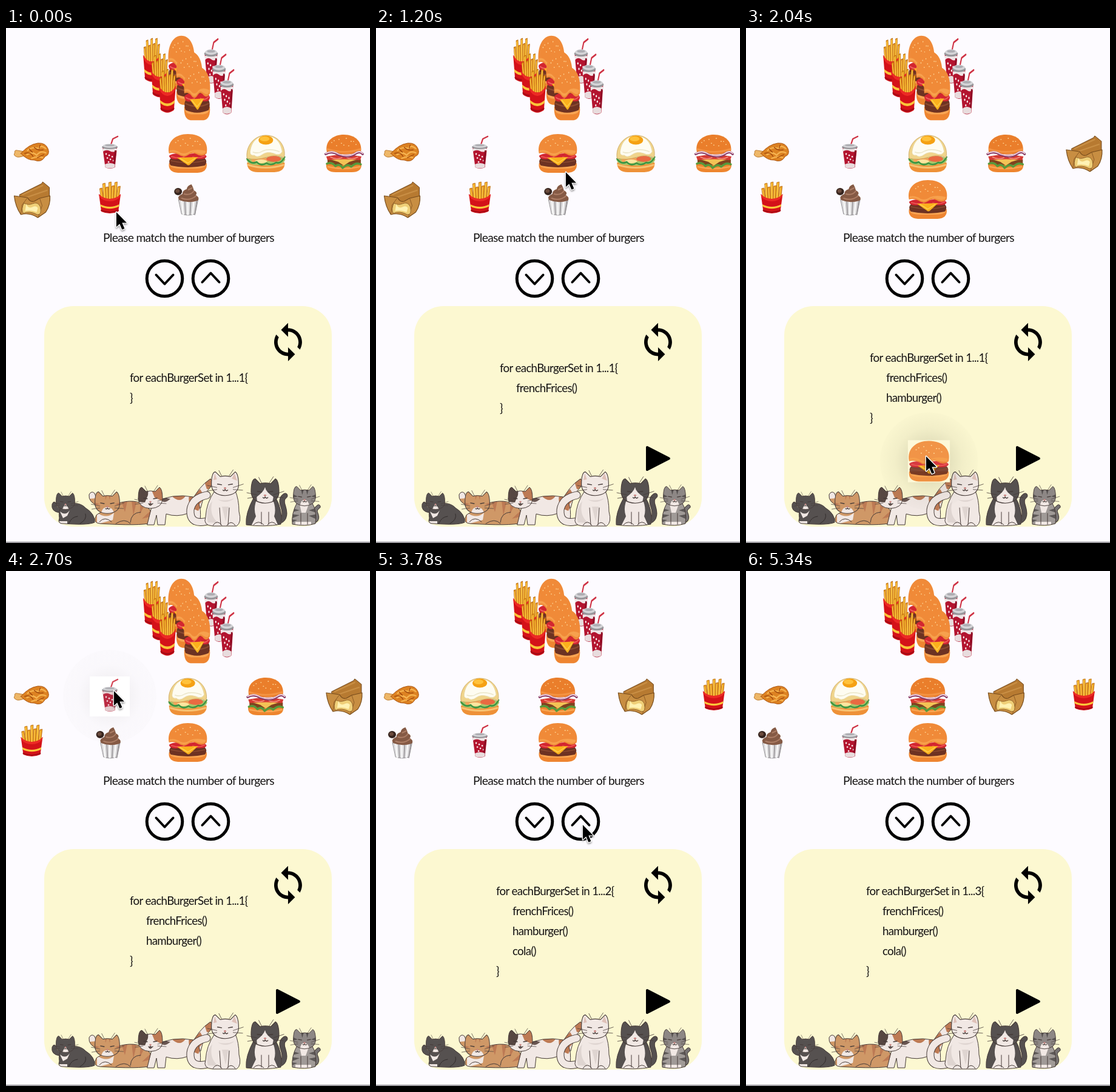
These frames come from a looping animation (600x850 px, 5.4 s). An HTML page with a canvas:

```html
<!DOCTYPE html>
<html lang="en">
<head>
<meta charset="utf-8">
<title>Burger loop</title>
<style>
html, body { margin: 0; width: 100%; height: 100%; overflow: hidden; background: #fdfbff; }
canvas { display: block; }
</style>
</head>
<body>
<canvas id="stage" width="600" height="850"></canvas>
<script>
const g = document.getElementById('stage').getContext('2d');
const LOOP = 5400, STEP = 60, INK = '#463b38';

const clamp = v => Math.max(0, Math.min(1, v));
const ease = v => { v = clamp(v); return v * v * (3 - 2 * v); };
const mix = (a, b, k) => a + (b - a) * k;

function path(d, fill, stroke, width = 1) {
  const p = new Path2D(d);
  if (fill) { g.fillStyle = fill; g.fill(p); }
  if (stroke) { g.strokeStyle = stroke; g.lineWidth = width; g.stroke(p); }
}
function oval(x, y, rx, ry, fill) {
  g.beginPath();
  g.ellipse(x, y, rx, ry, 0, 0, 7);
  g.fillStyle = fill;
  g.fill();
}
function at(x, y, sx, sy, draw) {
  g.save();
  g.translate(x, y);
  g.scale(sx, sy);
  draw();
  g.restore();
}
// Filled outline whose markings stay inside it.
function marked(d, fill, marks = []) {
  path(d, fill);
  g.save();
  g.clip(new Path2D(d));
  for (const [color, m] of marks) path(m, color);
  g.restore();
  path(d, null, INK, 1);
}
function seeds() {
  for (let i = 0; i < 11; i++) oval(-20 + i * 4, -18 - 8 * Math.sin(i * 2.4) * (1 - Math.abs(i - 5) / 9), 1, .8, '#ffdc9d');
}

const food = {
  burger() {
    path('M-31 16Q-33 31-16 32H16Q33 31 31 16Z', '#ee8531');
    path('M-30 19Q0 27 30 19Q29 24 14 25H-14Q-29 24-30 19Z', '#f8a553');
    path('M-28 8H28Q33 13 28 20Q0 26-28 20Q-33 13-28 8Z', '#6d3222');
    path('M-28 12Q0 19 28 12', null, '#8b4a31', 1.6);
    path('M-31 4Q-25-2 0 1Q28-3 31 5Q29 11 12 9L-12 9Q-29 12-31 4Z', '#d32630');
    path('M-27 5Q-15 9-6 6M8 6Q19 9 28 4', null, '#ee5c59', 1.6);
    path('M-18 7L17 6L4 18Q1 21-2 18Z', '#fbb01c');
    path('M-13 8L0 16L12 8', null, '#ffd04b', 1.5);
    path('M-31 0C-35-20-20-32 0-32C22-32 35-19 31 0Q23 7 14 1Q7-3 0 3Q-7 8-15 2Q-22-2-31 0Z', '#f08a38');
    path('M-30-5Q-20-7-12-1Q-4 2 4-4Q14-8 30-4Q28 4 14-1Q7-5 0 1Q-7 6-15 0Q-22-4-30-2Z', '#f7a14d');
    seeds();
  },
  egg() {
    path('M-31 15Q-31 31-13 31H14Q32 30 31 15Z', '#ee9138');
    path('M-29 19Q0 28 29 19', null, '#f9c271', 3);
    path('M-32 11Q-16 1 0 7Q20 1 32 9Q31 19 14 18Q4 22-8 19Q-28 21-32 11Z', '#a9c66a');
    oval(-10, 11, 14, 5, '#f3a35a');
    oval(13, 9, 12, 5, '#e96a42');
    oval(-8, 13, 10, 3, '#fbe6a0');
    path('M-31 9Q-24 19-15 14Q-8 22 1 16Q9 21 17 15Q25 18 31 6', null, '#3c9443', 2.6);
    path('M-31 8C-34-12-19-30 0-30C23-30 34-9 30 7Q18 1 2 6Q-16 12-31 8Z', '#f0d48b', '#c9a25a', .8);
    path('M-26-1C-25-17-16-29 1-29C20-28 25-14 27-3Q23 5 13 0Q2-4-6 2Q-14 8-19 3Q-25 4-26-1Z', '#fefcf1', '#e6d8a9', .8);
    path('M-21-2Q-12 1-5-4Q6-9 22-3', null, '#ebe6c9', 1.5);
    oval(0, -22, 12, 7.5, '#f5a113');
    oval(-2, -24, 8, 4, '#ffc23b');
  },
  onion() {
    path('M-29 17Q-31 31-13 31H13Q30 31 29 17Z', '#ee852e');
    path('M-26 22Q0 28 26 22', null, '#f8a653', 2.5);
    path('M-27 10H28V17Q0 22-27 17Z', '#80431f');
    path('M-25 9H25L9 14L0 20L-9 14Z', '#f3c355');
    path('M-29 5Q0-1 29 5L27 11Q0 8-27 11Z', '#d63a33');
    path('M-22 6Q-13 11-3 7M5 7Q14 11 23 6', null, '#f4907b', 1.5);
    path('M-28 17Q-20 13-14 21Q-7 16-2 24Q7 16 12 22Q20 14 28 18', null, '#579a3c', 3.4);
    path('M-28-2C-32-21-17-31 0-31C19-31 31-19 28-2Q0 5-28-2Z', '#ea7e2b');
    path('M-27-7Q0 2 27-7', null, '#f49342', 3);
    seeds();
    path('M-30 1Q-20-5-9 2Q7 8 18 1Q26-5 31 1', null, '#873c66', 4);
    path('M-30 0Q-20-6-9 1Q7 7 18 0Q26-6 31 0', null, '#efd3df', 1.8);
  },
  cola() {
    path('M2-15L5-24L13-28', null, '#cf3345', 2.3);
    path('M-12-10H12L8.5 23Q0 27-7.5 23Z', '#b3142f');
    path('M-12-8H12L11.6-4Q5-1 0-4Q-6-7-11.4-3Z', '#efe4e5');
    for (let i = 0; i < 7; i++) oval(-6 + i * 5 % 13, 1 + i * 2.2, 1.3, 1.4, '#fbecee');
    path('M8-5L11-5L8 21L5 23Z', '#8d0d25');
    path('M-8 18Q0 14 8.6 18L8 23Q0 26-7.5 23Z', '#e8dcdd');
    oval(0, -10.5, 13, 3.5, '#98979b');
    oval(0, -12.5, 11.5, 3.2, '#d5d5d8');
    oval(0, -13.5, 8, 1.6, '#adadb2');
  },
  fries() {
    for (let i = 0; i < 7; i++) {
      const x = -14 + i * 4.1, lean = (i - 3) * .9, top = [-18, -26, -20, -28, -22, -28, -21][i];
      path(`M${x} 2L${x + lean} ${top}l4-1L${x + 4} 2Z`, i % 2 ? '#f6b128' : '#eb9c1c', '#b8670f', .8);
      path(`M${x + 1.4} 0L${x + lean + 1.4} ${top + 2}`, null, '#ffd052', 1.2);
    }
    path('M-18-9Q-11-1 0-1Q11-1 18-9L14 20Q0 26-14 20Z', '#d41219');
    path('M-18-9Q-11-1 0-1Q11-1 18-9L17.3-5Q11 3 0 3Q-11 3-17.3-5Z', '#ec2a25');
    path('M-15.6 8Q0 16 15.6 8L15.2 11.5Q0 19-15.2 11.5Z', '#fbc63a');
    path('M-14 18Q0 24 14 18', null, '#a70b16', 2);
  },
  drum() {
    path('M-12-3L-24-5Q-29-6-28-1Q-31 3-26 5Q-23 8-10 3Z', '#eeb768', '#bd7b30');
    path('M-18 0Q-5-15 10-17Q23-18 27-7Q30 2 22 5Q16 16 4 11Q-7 12-18 0Z', '#dc8222', '#ac5310');
    path('M-7-5Q2-12 10-8Q15-15 23-8M-8 2Q1-4 8 3Q14-5 23-1M0 8Q11 4 18 7', null, '#f6b350', 2.3);
    path('M-12 0Q-2-3 2 5M4-10Q10-4 19-6M9 7L20 2M-4-7L1-2M14-14L12-9', null, '#994109', 1.2);
  },
  cheese() {
    path('M-20-8L16-26L18-29L29-20L29 2L17 8L-18 8Z', '#b77a31', '#70451c');
    path('M-15-8L18-23M-10-3L25-15', null, '#c98f45', 2);
    path('M-29-6L-7-3Q-3 5 4 3L13-2L30-6Q31 9 23 21L10 30Q-4 21-18 25Q-27 12-29-6Z', '#c88e42', '#784c1c', 1.2);
    path('M-7-3L-16 9L-18 24M13-2L17 10L11 29', null, '#8f5d25');
    path('M-13 6Q-6 10 1 7Q10 3 14 12Q17 26 9 25Q-4 18-14 23Q-18 16-13 6Z', '#efcf78', '#94652a');
    path('M-9 7Q-7 15 0 13Q7 9 10 14L8 21Q-1 17-11 19Z', '#fff2b4');
  },
  cupcake() {
    path('M-15 0H17L12 24Q0 28-10 24Z', '#deddde', '#929093');
    for (let i = -2; i < 4; i++) path(`M${i * 5} 1L${i * 3.8} 25`, null, i % 2 ? '#9d9a9d' : '#fff', 1.8);
    path('M-14 1Q-19-5-9-9Q-9-15-2-17Q-1-23 6-25Q9-20 10-15Q17-12 13-7Q21-3 16 2Q0 7-14 1Z', '#855a45');
    path('M-10-2Q3 3 14-6M-6-9Q4-6 10-14M1-16L7-19', null, '#ad7e66', 2);
    oval(-16, -13, 6.5, 6, '#37251f');
    oval(-17, -14, 3.5, 3, '#6b4b3d');
  }
};

const orders = [
  ['drum', 'cola', 'burger', 'egg', 'onion', 'cheese', 'fries', 'cupcake'],
  ['drum', 'cola', 'egg', 'onion', 'cheese', 'fries', 'cupcake', 'burger'],
  ['drum', 'egg', 'onion', 'cheese', 'fries', 'cupcake', 'cola', 'burger']
];
const shifts = [1620, 2860];
const cell = i => [42.5 + i % 5 * 128.6, 207 + Math.floor(i / 5) * 76];

const drags = [
  { kind: 'fries', lift: 440, go: 560, stop: 860, drop: 960, from: [171, 283], to: [293, 705] },
  { kind: 'burger', lift: 1340, go: 1500, stop: 1900, drop: 1980, from: [300, 207], to: [301.5, 715] },
  { kind: 'cola', lift: 2580, go: 2760, stop: 3180, drop: 3420, from: [171, 207], to: [293.5, 695] }
];
// time, x, y
const pointer = [
  [0, 181, 303], [360, 181, 303], [480, 172, 285], [560, 172, 285], [860, 290, 690], [960, 290, 690],
  [1200, 312, 237], [1320, 300, 205], [1500, 300, 205], [1900, 296, 706], [2100, 296, 706],
  [2580, 177, 197], [2760, 177, 197], [3180, 296, 669], [3480, 296, 669],
  [3720, 340, 418], [4020, 340, 418], [4320, 428, 577]
];
const POINTER_GONE = 4620;

function foods(t) {
  for (const kind of orders[0]) {
    let [x, y] = cell(orders[0].indexOf(kind));
    shifts.forEach((start, n) => {
      const [nx, ny] = cell(orders[n + 1].indexOf(kind));
      const k = ease((t - start) / 300);
      x = mix(x, nx, k);
      y = mix(y, ny, k);
    });
    at(x, y, 1, 1, food[kind]);
  }
}

function meal() {
  for (let i = 0; i < 3; i++) {
    const x = i * 13, y = 57 + i * 25.5;
    at(240 + x, y, .77, 1.38, food.fries);
    at(289 + x, y, .68, 1.38, food.burger);
    at(338 + x, y, .87, 1.38, food.cola);
  }
}

function preview(d, t) {
  const gone = clamp((t - d.drop - 60) / 185);
  if (t < d.lift || gone === 1) return;
  const k = ease((t - d.go) / (d.stop - d.go));
  const x = mix(mix(d.from[0], d.to[0], k), 268, gone);
  const y = mix(mix(d.from[1], d.to[1], k), 647, gone);
  const up = ease((t - d.lift) / 100), size = (1 + .05 * k) * (1 - gone);
  g.save();
  g.globalAlpha = up * (1 - gone);
  at(x, y, size, size, () => {
    const halo = g.createRadialGradient(0, 0, 24, 0, 0, 77);
    halo.addColorStop(0, `rgba(65,65,45,${mix(.06, .15, k)})`);
    halo.addColorStop(.55, `rgba(65,65,45,${mix(.015, .05, k)})`);
    halo.addColorStop(1, 'rgba(65,65,45,.012)');
    oval(0, 0, 77, 77, halo);
    path('M-33-33H33V33H-33Z', y > 459 ? '#fdf9d8' : '#fff');
    g.globalAlpha *= .9;
    food[d.kind]();
  });
  g.restore();
  if (y > 480 && t < d.drop) {
    oval(x + 34, y - 35, 20, 20, '#2db84d');
    path(`M${x + 24} ${y - 35}h20m-10-10v20`, null, '#fff', 3);
  }
}

function face(x, y, s, fur, marks) {
  at(x, y, s, s, () => {
    marked('M-20-1Q-20-20-14-20L-7-13Q0-15 8-13L15-20Q20-17 20 0Q19 14 0 15Q-19 14-20-1Z', fur, marks);
    path('M-11-2L-5-1M5-1L11-2M-3 7Q-1 9 0 6Q2 9 4 7', null, INK, 1.3);
    oval(0, 4, 1.8, 1.3, '#c98581');
    path('M-12 3L-26 0M-12 6L-25 8M12 3L27-2M12 6L26 7M-5-14L-9-22M6-14L12-23', null, INK, .7);
  });
}

function cats() {
  const dark = '#565150', white = '#f1e8e4', tan = '#cf9867', rust = '#bd7a54';
  // Dark loaf
  marked('M88 800Q74 798 76 786Q79 779 83 785Q82 792 92 793Z', dark);
  marked('M91 790Q118 778 131 792Q147 802 146 816Q135 821 96 818Q84 819 88 809Q86 798 91 790Z', dark,
    [[white, 'M89 798Q98 806 105 796L101 805L94 809Z'], [white, 'M86 814H101V820H86Z']]);
  path('M104 817Q108 807 118 806M122 818Q134 811 131 802', null, '#332d2c');
  face(98, 783, .78, dark, [[white, 'M-7 15L-2 5H2L8 15Z']]);
  // Ginger
  marked('M154 790Q135 783 137 770Q141 763 146 768L149 776L160 785Z', tan, [[white, 'M134 762H149V776L138 777Z']]);
  marked('M174 788Q207 775 226 786Q246 797 239 817Q221 822 155 818Q142 817 149 804Z', tan, [
    [rust, 'M190 780L196 799L200 781ZM207 780L210 805L215 783ZM222 783L220 804L228 788ZM238 797L224 810L240 806Z'],
    [white, 'M150 800Q166 811 178 800L176 812L150 819Z']]);
  path('M154 815Q163 805 174 815M181 818Q196 808 205 818M205 816Q206 800 222 799', null, INK);
  face(167, 786, 1.02, tan, [[rust, 'M-4-17L-3-7L0-15ZM2-15L4-7L6-17ZM-21-3L-12 0L-21 2ZM21-3L12 0L21 2Z'], [white, 'M-10 15Q-8 4 0 5Q9 5 11 15Z']]);
  // Calico
  marked('M304 785Q317 757 337 744Q343 748 337 758Q326 768 321 792Z', white, [[rust, 'M326 746L344 740V762L331 761ZM308 773L320 761L328 775L318 787Z']]);
  marked('M242 784Q274 767 309 774Q325 785 319 819H308L300 801Q282 808 264 802L262 820H250L248 804L244 820H233Z', white,
    [[rust, 'M268 767Q286 789 297 771ZM302 771Q298 791 317 797L326 776Z'], ['#695651', 'M253 774Q258 789 271 777Z']]);
  face(238, 778, 1, white, [['#574742', 'M-22-22H-3L-4-7L-9 5L-22 4Z'], [rust, 'M2-15L7-3L22 4V-22H8Z']]);
  path('M235 786Q238 791 241 786', '#574742');
  // White sitter
  path('M339 812Q302 824 304 795Q307 776 331 771', null, INK, 13);
  path('M339 812Q302 824 304 795Q307 776 331 771', null, white, 11);
  marked('M344 764Q330 784 329 807Q324 821 341 822H380Q389 816 384 798Q384 778 378 764Z', white,
    [['#dfd5d1', 'M333 816Q328 795 340 781Q334 804 350 817ZM349 778Q363 787 377 776Q363 782 349 778ZM356 790L362 815L367 790Z']]);
  path('M352 792L354 820M368 792L366 820M341 821Q348 810 356 821M364 821Q371 811 378 821', null, INK);
  face(361, 755, 1.12, white, [['#dfc1b8', 'M-15-18L-12-9L-17-8ZM14-18L18-7L10-10Z']]);
  // Tuxedo
  path('M446 815Q464 813 457 790Q452 777 460 772', null, INK, 9);
  path('M446 815Q464 813 457 790Q452 777 460 772', null, dark, 7);
  marked('M409 774Q394 801 396 820Q426 824 453 819Q457 797 444 774Z', white,
    [[dark, 'M390 770H417Q406 790 412 806L404 822H390ZM436 770H460V822H449L442 806Q447 791 436 770Z']]);
  path('M421 799V819M433 799V819M408 820Q416 811 425 820M431 820Q438 811 446 820', null, INK);
  face(427, 767, 1.15, dark, [[white, 'M0-8Q1-1 12 6L10 16H-11L-12 6Q-2-1 0-8Z']]);
  // Grey tabby
  path('M502 815Q517 814 511 801Q508 795 515 790', null, INK, 7);
  path('M502 815Q517 814 511 801Q508 795 515 790', null, '#777373', 5);
  marked('M480 783Q470 801 472 819Q494 823 510 818Q513 796 504 783Z', '#a09a97',
    [['#5d5857', 'M470 792L484 796L472 799ZM470 802L484 804L472 809ZM470 811L480 812L472 816ZM512 792L499 796L512 800ZM513 802L499 805L512 811Z'], [white, 'M484 786H499L494 800H487ZM477 815H503V822H477Z']]);
  path('M486 801V819M497 801V819', null, INK);
  face(492, 775, .92, '#8d8785', [['#55504f', 'M-7-18L-4-5L-1-15ZM2-16L5-5L8-17ZM-21-6L-12-2L-21 0ZM21-6L12-2L21 0Z'], [white, 'M-8 16Q-7 4 0 4Q7 4 9 16Z']]);
}

function controls(t) {
  path('M111 459H489A48 48 0 0 1 537 507V775A48 48 0 0 1 489 823H111A48 48 0 0 1 63 775V507A48 48 0 0 1 111 459Z', '#fcf8d1');
  for (const x of [261.5, 337.5]) {
    g.beginPath();
    g.arc(x, 413.5, 29.3, 0, 7);
    g.strokeStyle = '#000';
    g.lineWidth = 5;
    g.stroke();
  }
  path('M247.5 407.5L261.5 422.5L275.5 407.5M323.5 419.5L337.5 404.5L351.5 419.5', null, '#000', 4);
  at(430.5, 484, 2.87, 2.87, () => path('M12 4V1L8 5l4 4V6c3.3 0 6 2.7 6 6 0 1-.25 2-.7 2.8l1.5 1.5C19.5 15 20 13.6 20 12c0-4.4-3.6-8-8-8zm0 14c-3.3 0-6-2.7-6-6 0-1 .25-2 .7-2.8L5.2 7.7C4.5 9 4 10.4 4 12c0 4.4 3.6 8 8 8v3l4-4-4-4v3z', '#000'));
  if (t >= drags[0].drop) path('M447 692L483 710.5L447 729Z', '#000', '#000', 4);
}

function words(t) {
  const write = (s, x, y, size) => {
    g.font = `${size}px Lato, sans-serif`;
    g.fillText(s, x, y);
  };
  g.fillStyle = '#161414';
  g.textBaseline = 'middle';
  g.letterSpacing = '-0.7px';
  write('Please match the number of burgers', 160, 347, 19.3);
  const count = t < 3780 ? 1 : t < 3960 ? 2 : 3;
  const calls = ['frenchFrices()', 'hamburger()', 'cola()'].filter((_, i) => t >= drags[i].drop);
  const lines = [`for eachBurgerSet in 1...${count}{`, ...calls, '}'];
  const left = count > 1 ? 198 : 204;
  lines.forEach((s, i) => {
    const inner = i > 0 && i < lines.length - 1;
    write(s, left + (inner ? 27 : 0), 595 + (i - (lines.length - 1) / 2) * 33, 18.7);
  });
}

function cursor(t) {
  if (t >= POINTER_GONE) return;
  let i = 0;
  while (i < pointer.length - 2 && t >= pointer[i + 1][0]) i++;
  const [t0, x0, y0] = pointer[i], [t1, x1, y1] = pointer[i + 1];
  const k = ease((t - t0) / (t1 - t0));
  at(mix(x0, x1, k), mix(y0, y1, k), .9, .9, () => {
    g.shadowColor = 'rgba(0,0,0,.3)';
    g.shadowBlur = 3;
    g.shadowOffsetY = 2;
    const arrow = 'M1 1V28L7 22.5L11.5 33L16 31L11.5 20.5H20Z';
    path(arrow, '#fff', '#fff', 3);
    g.shadowColor = 'transparent';
    path(arrow, '#000');
  });
}

function draw(t) {
  g.fillStyle = '#fdfbff';
  g.fillRect(0, 0, 600, 850);
  g.lineCap = g.lineJoin = 'round';
  meal();
  foods(t);
  controls(t);
  words(t);
  cats();
  drags.forEach(d => preview(d, t));
  g.fillStyle = '#77757a';
  g.fillRect(0, 848, 600, 1.5);
  cursor(t);
}

let start;
function tick(now) {
  start ??= now;
  draw(Math.floor((now - start) % LOOP / STEP) * STEP);
  requestAnimationFrame(tick);
}
draw(0);
requestAnimationFrame(tick);
</script>
</body>
</html>
```
